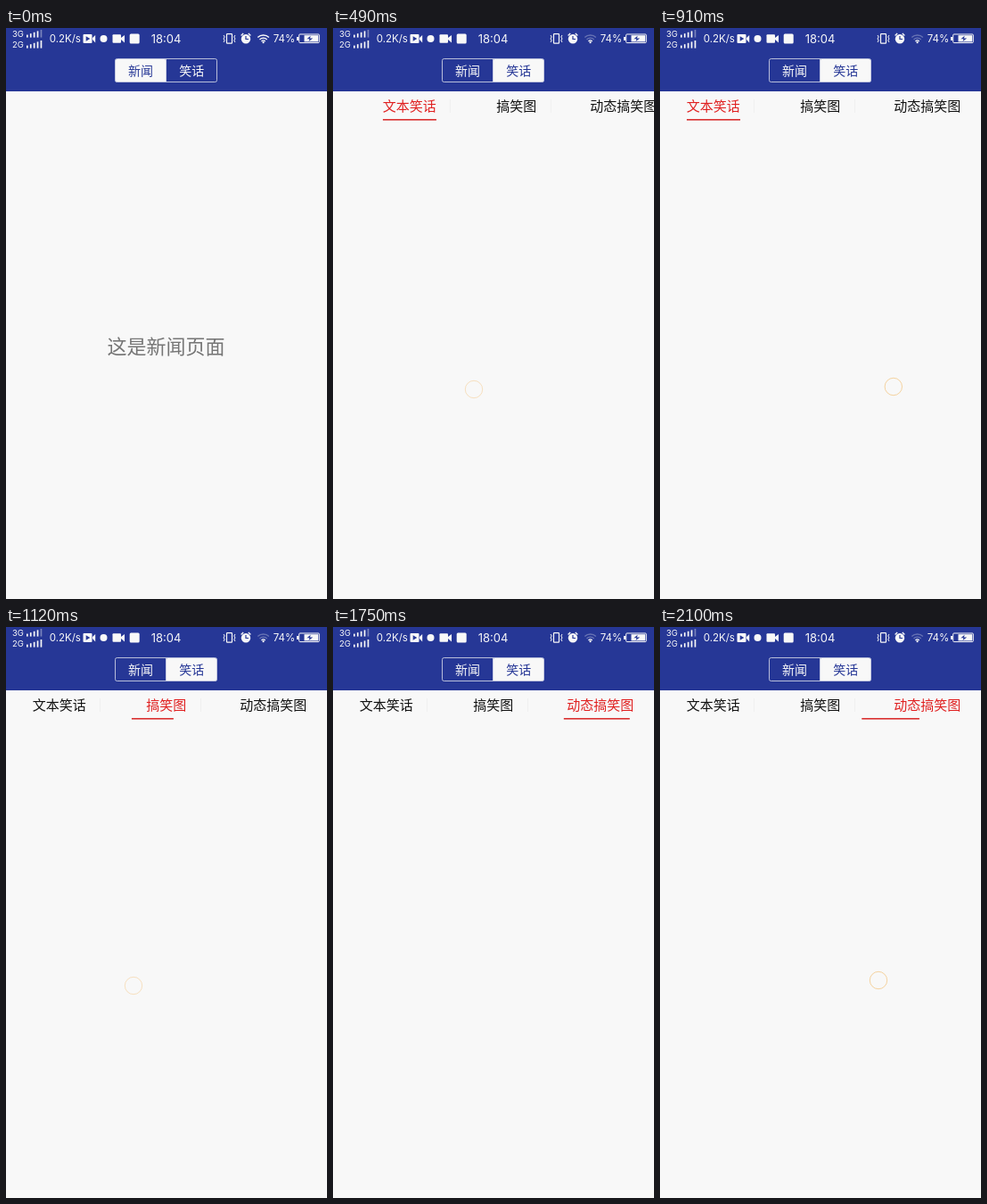
Write an HTML page that moves like this. It is 360x640 px and loops after 2170 ms.

```html
<!DOCTYPE html>
<html lang="zh">
<head>
<meta charset="utf-8">
<style>
  html, body { margin: 0; width: 100%; height: 100%; overflow: hidden; background: #f8f8f8; }
  svg { display: block; width: 360px; height: 640px; }
  text { font-family: Inter, Roboto, sans-serif; }
  .cjk text, text.cjk { font-family: "Noto Sans CJK SC", "Noto Sans CJK", sans-serif; }
  .mid { text-anchor: middle; }
</style>
</head>
<body>
<svg viewBox="0 0 360 640">
  <rect width="360" height="640" fill="#f8f8f8"/>
  <text id="news" class="cjk mid" x="179.5" y="364.7" font-size="22" fill="#757575">这是新闻页面</text>
  <g id="jokes" class="cjk" font-size="15">
    <path d="M105.5 80v15M218.5 80v15" stroke="#f0f0f0"/>
    <text class="tab" x="29.8" y="92.8">文本笑话</text>
    <text class="tab" x="157.3" y="92.8">搞笑图</text>
    <text class="tab" x="262.3" y="92.8">动态搞笑图</text>
    <rect id="line" y="102" height="1.6" fill="#d93030"/>
  </g>
  <circle id="touch" r="9.7" fill="none" stroke="#f3c27a"/>

  <rect width="360" height="71" fill="#263796"/>
  <g fill="#f8f8f8">
    <g font-size="9.5">
      <text x="7" y="10.2">3G</text>
      <text x="7" y="22.2">2G</text>
    </g>
    <g id="bars"></g>
    <text x="48.7" y="16.4" font-size="11.5">0.2K/s</text>
    <text x="162.7" y="17" font-size="13">18:04</text>
    <text x="299.7" y="16.4" font-size="11.5">74%</text>

    <rect x="86.5" y="7" width="10" height="10" rx="1"/>
    <path d="M97 11l3.2-3v8.4L97 13z"/>
    <path d="M89.7 9.2v5.6l4.6-2.8z" fill="#263796"/>
    <circle cx="109.5" cy="12" r="4"/>
    <rect x="119.5" y="7.3" width="9.5" height="9.4" rx="1"/>
    <path d="M129 11l4-3v8.4l-4-3.4z"/>
    <rect x="138.7" y="6.5" width="11" height="11" rx="1.5"/>

    <rect x="247.5" y="6.7" width="6" height="10.4" rx=".7" fill="none" stroke="#f8f8f8" stroke-width="1.2"/>
    <path d="M244 8l1.2 2-1.2 2 1.2 2-1.2 2M257 8l-1.2 2 1.2 2-1.2 2 1.2 2" fill="none" stroke="#f8f8f8"/>
    <circle cx="269" cy="12.2" r="5.2"/>
    <path d="M263.6 8.4l2.6-2.3M274.4 8.4l-2.6-2.3" stroke="#f8f8f8" stroke-width="1.4"/>
    <path d="M269 9v3.5h3" fill="none" stroke="#263796" stroke-width="1.2"/>

    <g fill="none" stroke="#f8f8f8" stroke-width="1.4">
      <path id="wifi" d="M282.3 10.6a8.8 8.8 0 0 1 12.6 0M284.5 12.9a5.8 5.8 0 0 1 8.2 0"/>
      <path d="M286.5 14.9a3 3 0 0 1 4.2 0"/>
    </g>
    <circle cx="288.6" cy="16.2" r="1.1"/>

    <rect x="326" y="10" width="2" height="4"/>
    <rect x="328.7" y="7" width="22.6" height="9.6" rx="1" fill="none" stroke="#f8f8f8"/>
    <rect x="334.5" y="8.2" width="15.7" height="7.2"/>
    <path d="M341.6 8.8l-4.2 3.4h3l-.8 2.8 4.6-3.6h-3.2z" fill="#263796"/>
  </g>

  <rect id="thumb" y="35" width="57" height="25.5" rx="1.5" fill="#f8f8f8"/>
  <path d="M179.5 35v25.5" stroke="#c9cde3"/>
  <rect x="122.5" y="34.5" width="114" height="26" rx="2" fill="none" stroke="#c9cde3" stroke-width=".9"/>
  <g class="cjk mid" font-size="14">
    <text class="seg" x="151" y="53">新闻</text>
    <text class="seg" x="208.2" y="53">笑话</text>
  </g>
</svg>
<script>
const STEP = 70, LOOP = 2170, WIDTH = 360;
const $ = id => document.getElementById(id);
const all = name => [...document.querySelectorAll(name)];
const tabs = all('.tab'), segments = all('.seg');
const tabBoxes = [[30, 60], [157.5, 45], [262.5, 75]];

// Page position by step; 0 is the news page, 1 to 3 are the joke tabs.
const positions = {
  0: 0, 5: .04, 6: .4, 7: .928, 8: .99, 9: 1,
  14: 1.06, 15: 1.33, 16: 1.87, 17: 1.985, 18: 2,
  22: 2.04, 23: 2.35, 24: 2.8, 25: 2.965, 26: 2.995, 27: 3,
  29: 2.9, 30: 2.655
};
// The finger is at x when the page is at pos; its ring lingers one step after release.
const swipes = [
  { down: 4, up: 6, pos: .4, x: 158, y: 405 },
  { down: 13, up: 15, pos: 1.33, x: 143, y: 402 },
  { down: 21, up: 23, pos: 2.04, x: 234, y: 412 },
  { down: 28, up: 30, pos: 2.655, x: 245, y: 396 }
];

const positionAt = step => {
  while (!(step in positions)) step--;
  return positions[step];
};

for (const base of [10.6, 22.6]) {
  for (let i = 0; i < 5; i++) {
    const height = 3 + i * 1.4;
    $('bars').insertAdjacentHTML('beforeend',
      `<rect x="${23 + i * 3.9}" y="${base - height}" width="1.7" height="${height}"
        opacity="${i === 4 && base < 12 ? .4 : 1}"/>`);
  }
}

function drawLine(progress) {
  const i = Math.min(1, Math.floor(progress)), f = progress - i;
  const [left, width] = tabBoxes[i].map((v, k) => v + (tabBoxes[i + 1][k] - v) * f);
  $('line').setAttribute('x', left);
  $('line').setAttribute('width', width);
}

function drawTouch(step) {
  const swipe = swipes.find(s => step >= s.down && step <= s.up + 1);
  $('touch').style.display = swipe ? '' : 'none';
  if (!swipe) return;
  const pos = positionAt(Math.min(step, swipe.up));
  $('touch').setAttribute('cx', swipe.x - WIDTH * (pos - swipe.pos));
  $('touch').setAttribute('cy', swipe.y);
  $('touch').setAttribute('opacity', step > swipe.up ? .45 : .7);
}

function draw(step) {
  const pos = positionAt(step);
  const page = [7, 16, 24].filter(s => step >= s).length;
  const selected = page ? 1 : 0;
  $('news').setAttribute('transform', `translate(${-WIDTH * pos})`);
  $('jokes').setAttribute('transform', `translate(${WIDTH * Math.max(0, 1 - pos)})`);
  drawLine(Math.max(0, pos - 1));
  drawTouch(step);
  tabs.forEach((tab, i) => tab.setAttribute('fill', i === Math.max(0, page - 1) ? '#e02020' : '#111'));
  segments.forEach((seg, i) => seg.setAttribute('fill', i === selected ? '#263796' : '#f8f8f8'));
  $('thumb').setAttribute('x', selected ? 179.5 : 122.5);
  $('wifi').setAttribute('opacity', step < 4 ? 1 : .3);
}

const start = performance.now();
function tick() {
  draw(Math.floor((performance.now() - start) % LOOP / STEP));
  requestAnimationFrame(tick);
}
tick();
</script>
</body>
</html>
```
